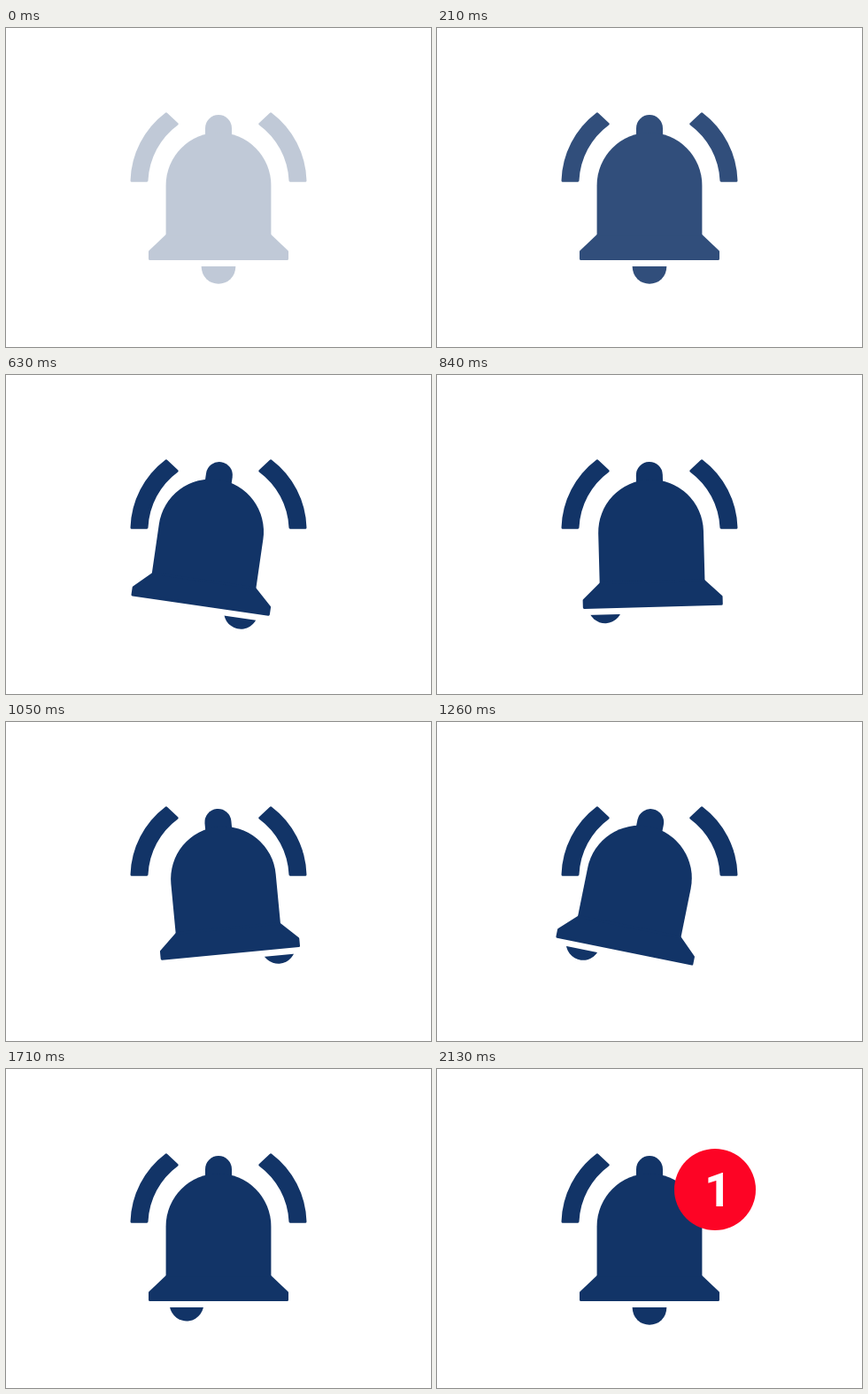
Animation of 480 by 360 pixels, one loop 2.73 s. Source, as an HTML page:

```html
<!DOCTYPE html>
<html lang="en">
<head>
<meta charset="utf-8">
<title>Notification bell</title>
<style>
  html, body { margin: 0; width: 100%; height: 100%; overflow: hidden; background: #fff; }
  svg { display: block; width: 100%; height: 100%; }
  #icon { fill: #123467; }
  .soft { stroke: #123467; stroke-width: 3; stroke-linejoin: round; }
  #badge circle { fill: #fd0425; }
  #badge text { fill: #fff; font: 700 53.5px Roboto, "Liberation Sans", sans-serif; }
</style>
</head>
<body>
<svg viewBox="0 0 480 360">
  <defs>
    <clipPath id="below"><rect x="100" y="269" width="280" height="60"/></clipPath>
    <path id="wave" class="soft" d="M142 172.3A98 98 0 0 1 180.9 96.9L193.2 108.3A84 84 0 0 0 159 172.3Z"/>
  </defs>
  <g id="icon">
    <use href="#wave"/>
    <use href="#wave" transform="matrix(-1 0 0 1 480 0)"/>
    <g id="bell">
      <path d="M225 130V113a15 15 0 0 1 30 0V130Z"/>
      <path d="M180.6 240V177.4a59.4 59.4 0 0 1 118.8 0V240Z"/>
      <path class="soft" d="M182.5 233.3L162.5 252.3V260.5H317.5V252.3L297.5 233.3Z"/>
      <g clip-path="url(#below)">
        <circle id="clapper" cx="240" cy="269.5" r="19.3"/>
      </g>
    </g>
  </g>
  <g id="badge">
    <circle r="46"/>
    <text x="-12" y="19">1</text>
  </g>
</svg>
<script>
  const LOOP = 2730, STEP = 30;
  const [icon, bell, clapper, badge] =
    ["icon", "bell", "clapper", "badge"].map(id => document.getElementById(id));

  const clamp = (x, low, high) => Math.min(high, Math.max(low, x));
  const ramp = (t, from, to) => clamp((t - from) / (to - from), 0, 1);
  const smooth = p => (1 - Math.cos(Math.PI * p)) / 2;
  const easeOut = p => 1 - (1 - p) ** 2;
  const wave = (t, peak, half) => -Math.cos(Math.PI * (t - peak) / half);
  const rotate = angle => `rotate(${angle} 240 119)`;

  // Lean left, swing back and forth four times, return to rest
  function bellAngle(t) {
    const half = 242, first = 470, last = first + 4 * half;
    const lean = smooth(ramp(t, 268, first)) - smooth(ramp(t, last, last + half));
    return 17 * lean * wave(clamp(t, first, last), first, half);
  }

  // Relative to the bell: lags behind it, gains width, then settles
  function clapperAngle(t) {
    const width = (16.5 + t / 185) * ramp(t, 240, 590) * (1 - smooth(ramp(t, 1710, 1980)));
    return width * wave(t, 596, 238);
  }

  function draw(now) {
    // Each pose is held for one step
    const t = Math.floor((now % LOOP) / STEP) * STEP;
    icon.setAttribute("opacity", 0.26 + 0.74 * ramp(t, 75, 240));
    bell.setAttribute("transform", rotate(bellAngle(t)));
    clapper.setAttribute("transform", rotate(clapperAngle(t)));
    badge.setAttribute("transform", `translate(314 136) scale(${easeOut(ramp(t, 1800, 2130))})`);
  }

  const start = performance.now();
  function tick() {
    draw(performance.now() - start);
    requestAnimationFrame(tick);
  }
  tick();
</script>
</body>
</html>
```
